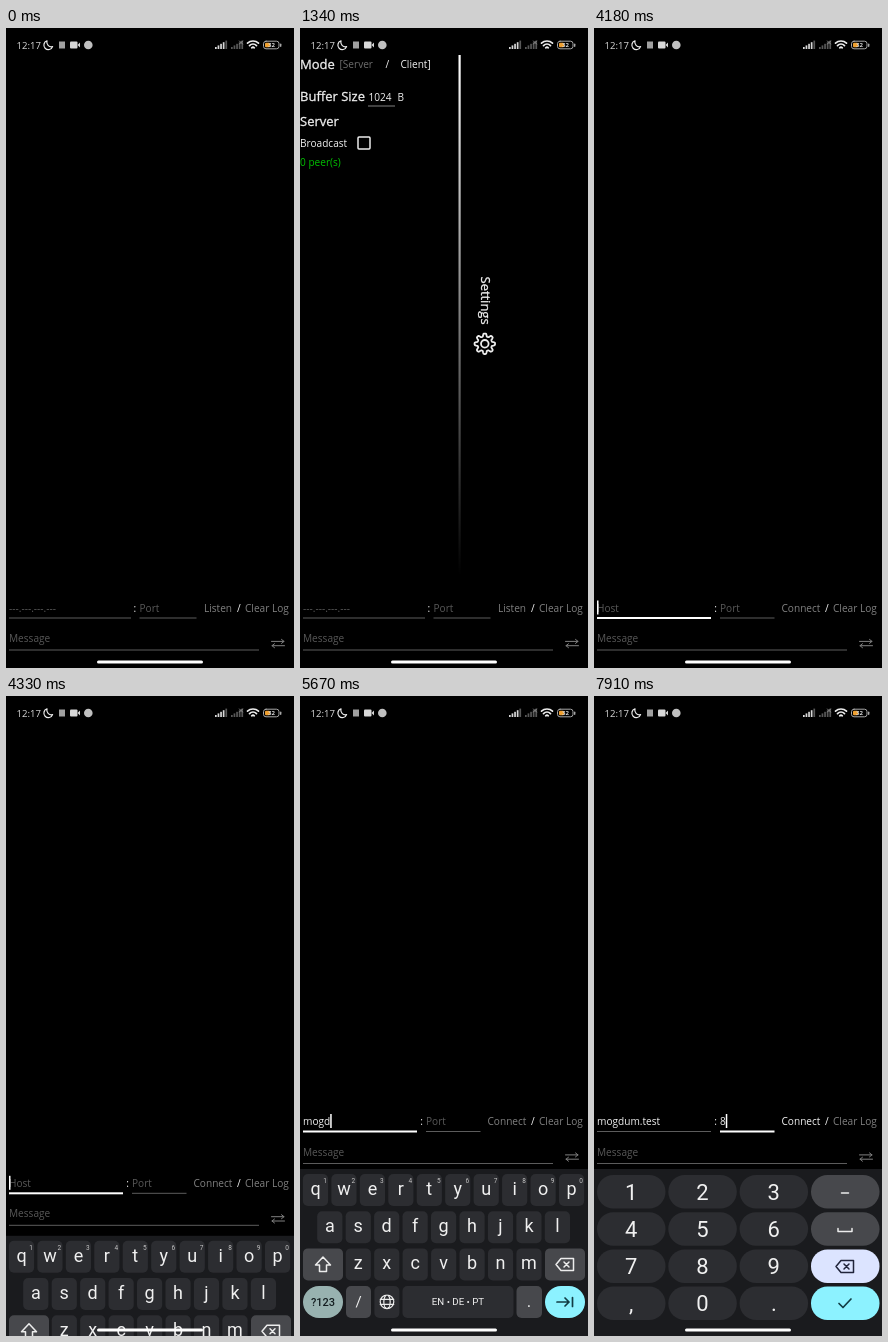
An HTML page that plays this animation: 288x640 px, repeating every 8000 ms.

```html
<!DOCTYPE html>
<html lang="en">
<head>
<meta charset="utf-8">
<title>Socket console</title>
<style>
  html, body { margin: 0; width: 100%; height: 100%; overflow: hidden; background: #000; }
  svg { display: block; width: 288px; height: 640px; }
  text { font-family: "Open Sans", "Noto Sans", sans-serif; font-size: 10.1px; white-space: pre; }
  .big { font-size: 13px; stroke: #f0f0f0; stroke-width: .3px; }
  .key { font-family: Roboto, sans-serif; text-anchor: middle; }
  .line { fill: none; stroke: #ececec; stroke-width: 1.5; stroke-linecap: round; stroke-linejoin: round; }
</style>
</head>
<body>
<svg viewBox="0 0 288 640">
  <defs>
    <linearGradient id="fade" x1="0" y1="0" x2="0" y2="1">
      <stop offset="0" stop-color="#fff"/>
      <stop offset="1" stop-color="#fff" stop-opacity="0"/>
    </linearGradient>
    <clipPath id="reveal"><rect id="revealBox" y="24" height="540"/></clipPath>
  </defs>
  <rect width="288" height="640"/>
  <g id="status"></g>
  <g id="drawer" clip-path="url(#reveal)"></g>
  <g id="handle"></g>
  <g id="form"></g>
  <g id="keyboard"><g id="letters"></g><g id="digits"></g></g>
  <rect x="91" y="632.5" width="106" height="3" rx="1.5" fill="#fff"/>
</svg>
<script>
const LOOP = 8000;
const HOST = 'mogdum.test';
const BRIGHT = '#f0f0f0', MID = '#808080', DIM = '#585858', RULE = '#5c5c5c';
const BOARD = '#1a1b1e', KEY = '#2c2d31', KEY_ALT = '#47484c', CYAN = '#8cf2ff', INK = '#123c44';

const $ = id => document.getElementById(id);
function add(parent, tag, attrs = {}, content) {
  const el = document.createElementNS('http://www.w3.org/2000/svg', tag);
  set(el, attrs);
  if (content !== undefined) el.textContent = content;
  parent.appendChild(el);
  return el;
}
function set(el, attrs) {
  for (const k in attrs) el.setAttribute(k, attrs[k]);
}
const box = (p, x, y, width, height, fill, rx = 0) => add(p, 'rect', { x, y, width, height, fill, rx });
const label = (p, x, y, s, fill = BRIGHT, cls = '') => add(p, 'text', { x, y, class: cls, style: `fill:${fill}` }, s);
const path = (p, d, style = '') => add(p, 'path', { d, class: 'line', style });
const tint = (el, c) => { el.style.fill = c; };

// Status bar
const status = $('status');
const LIT = '#d8d8d8', UNLIT = '#585858';
set(label(status, 10.5, 20.8, '12:17'), { style: `font-size:9.6px;font-weight:500;fill:${LIT}` });
path(status, 'M41 12.8a4.5 4.5 0 1 0 5.6 5.8a4.6 4.6 0 0 1 -5.6 -5.8z', 'stroke-width:1.2');
box(status, 53, 13.5, 6, 7, '#a0a0a0');
box(status, 64, 13.5, 7.5, 7, LIT, 1);
path(status, 'M71.5 17l2.5 -2.5v5z', `fill:${LIT};stroke:none`);
add(status, 'circle', { cx: 82.3, cy: 17, r: 4.3, fill: '#c0c0c0' });
for (let i = 0; i < 5; i++) {
  const h = 2 + i * 1.6;
  box(status, 209 + i * 2.6, 21 - h, 1.7, h, i < 4 ? LIT : UNLIT);
  box(status, 225 + i * 2.6, 21 - h, 1.7, h, UNLIT);
}
path(status, 'M233.5 13l3 3m0 -3l-3 3', 'stroke:#909090;stroke-width:1');
path(status, 'M241.5 15.2a8 8 0 0 1 11 0M243.5 17.6a5 5 0 0 1 7 0M245.7 19.8a2 2 0 0 1 2.6 0', 'stroke-width:1.7');
add(status, 'rect', { x: 257.5, y: 13.2, width: 15.5, height: 7.6, rx: 2.5, class: 'line', style: 'stroke:#a8a8a8;stroke-width:1' });
box(status, 259, 14.8, 5, 4.5, '#f0a030', 1);
add(status, 'text', { x: 262, y: 19.2, style: `font-size:6px;font-weight:700;fill:${LIT}` }, '32');
box(status, 274, 15.5, 1.4, 3.5, '#a8a8a8', .7);

// Settings drawer
const drawer = $('drawer');
label(drawer, 0, 41, 'Mode', BRIGHT, 'big');
const modeServer = label(drawer, 39.5, 40, '[Server');
label(drawer, 85.5, 40, '/');
const modeClient = label(drawer, 100.5, 40, 'Client]');
label(drawer, 0, 73, 'Buffer Size', BRIGHT, 'big');
label(drawer, 68.5, 72.5, '1024');
box(drawer, 68, 77.5, 27, 1, MID);
label(drawer, 97.5, 72.5, 'B');
label(drawer, 0, 98, 'Server', BRIGHT, 'big');
label(drawer, 0, 118.5, 'Broadcast');
add(drawer, 'rect', { x: 58, y: 109, width: 12, height: 12, rx: 1, class: 'line' });
label(drawer, 0, 138, '0 peer(s)', '#00c000');

// Drawer edge and its tab, placed relative to the edge
const handle = $('handle');
box(handle, -1, 27, 2.2, 520, 'url(#fade)');
set(label(handle, 0, 0, 'Settings', BRIGHT, 'big'), { transform: 'translate(21 248.5) rotate(90)' });
let gear = '';
for (let i = 0; i <= 96; i++) {
  const a = i / 96 * 2 * Math.PI;
  const r = 8.8 + 1.5 * Math.tanh(2.2 * Math.cos(8 * a));
  gear += `${i ? 'L' : 'M'}${(25.3 + r * Math.cos(a)).toFixed(2)} ${(315.8 + r * Math.sin(a)).toFixed(2)}`;
}
path(handle, gear + 'z', 'stroke-width:1.8');
add(handle, 'circle', { cx: 25.3, cy: 315.8, r: 3.8, class: 'line', style: 'stroke-width:1.8' });

// Connection form
const form = $('form');
const host = label(form, 3, 583.5, '');
const colon = label(form, 127.5, 583.5, ':');
const port = label(form, 133.5, 583.5, '');
const action = label(form, 198, 583.5, '');
label(form, 231, 583.5, '/');
label(form, 239, 583.5, 'Clear Log', MID);
const hostRule = box(form, 3, 589.5, 122, 1, RULE);
const portRule = box(form, 134, 589.5, 57, 1, RULE);
const caret = box(form, 3, 572.5, 1.5, 14, '#fff');
label(form, 3, 614, 'Message', DIM);
box(form, 3, 621.5, 250, 1, RULE);
path(form, 'M265.5 613.4h12.5m-2.5 -2l2.5 2l-2.5 2M278.5 617.7h-12.5m2.5 -2l-2.5 2l2.5 2', `stroke:${MID};stroke-width:1`);

// Keyboard
const letters = $('letters'), digits = $('digits');
const keyText = (p, x, y, s, size, fill = '#f0f0f0') =>
  add(p, 'text', { x, y, class: 'key', style: `font-size:${size}px;fill:${fill}` }, s);
const backspace = (p, x, y, ink) =>
  path(p, `M${x - 9} ${y}l5 -6h12.5v12h-12.5zM${x - 1} ${y - 2.5}l5 5m0 -5l-5 5`, `stroke:${ink}`);

box(letters, 0, 473, 288, 167, BOARD);
['qwertyuiop', 'asdfghjkl', 'zxcvbnm'].forEach((row, r) => {
  [...row].forEach((ch, i) => {
    const x = [15.5, 29.8, 58.3][r] + i * 28.45, y = 478 + r * 37.2;
    box(letters, x - 12.6, y, 25.2, 32, KEY, 5);
    keyText(letters, x, y + 21, ch, 18);
    if (!r) keyText(letters, x + 9.5, y + 9, (i + 1) % 10, 6.5, '#c4c4c4');
  });
});
box(letters, 3, 552.4, 40, 32, KEY_ALT, 5);
path(letters, 'M23 561l7.5 8h-4v6.5h-7v-6.5h-4z');
box(letters, 245, 552.4, 40, 32, KEY_ALT, 5);
backspace(letters, 265, 568.5, '#ececec');
box(letters, 3, 590, 40, 32, '#98b2b0', 16);
keyText(letters, 23, 609.5, '?123', 11, '#141e20').style.fontWeight = 500;
box(letters, 46, 590, 25, 32, KEY_ALT, 5);
keyText(letters, 58.5, 611, '/', 15);
box(letters, 74.4, 590, 25, 32, KEY, 5);
path(letters, 'M80.2 603.3h13.6M80.2 608.3h13.6M87 599a6.8 6.8 0 0 0 0 13.6a6.8 6.8 0 0 0 0 -13.6a3.2 6.8 0 0 0 0 13.6a3.2 6.8 0 0 0 0 -13.6', 'stroke-width:1.2');
box(letters, 102.5, 590, 111, 32, KEY, 5);
keyText(letters, 158, 609, 'EN • DE • PT', 9.7);
box(letters, 216.5, 590, 25.5, 32, KEY_ALT, 5);
keyText(letters, 229, 611, '.', 17);
box(letters, 245, 590, 40, 32, CYAN, 16);
path(letters, 'M257 606h12m-4 -4l4 4l-4 4M272.5 601.5v9', `stroke:${INK};stroke-width:1.7`);

box(digits, 0, 473, 288, 167, BOARD);
['123', '456', '789', ',0.'].forEach((row, r) => {
  const y = 479 + r * 37.2;
  [...row].forEach((ch, i) => {
    box(digits, 3 + i * 71.3, y, 68.5, 33.5, KEY, 16.5);
    keyText(digits, 37.2 + i * 71.3, y + 24.5, ch, 22);
  });
  box(digits, 217, y, 68.5, 33.5, [KEY_ALT, KEY_ALT, '#dce4ff', CYAN][r], 16.5);
});
path(digits, 'M247.5 497h7M244 532.5v3h14v-3');
backspace(digits, 251, 570.5, '#20243a');
path(digits, 'M245 607.5l4 4l8 -8.5', `stroke:${INK};stroke-width:1.7`);

// Value of the last [time, value] pair already reached
const held = (t, pairs) => pairs.reduce((v, [at, next]) => t >= at ? next : v, pairs[0][1]);
const mix = (a, b, k) => a + (b - a) * k;

function draw(t) {
  // Drawer
  const w = held(t, [[0, 0], [900, 8], [1040, 88], [1190, 149], [1340, 159.5], [2990, 128], [3140, 44], [3280, 0]]);
  const open = w / 159.5;
  set($('revealBox'), { width: w });
  set(handle, { transform: `translate(${w} 0)`, opacity: open < .1 ? 0 : open });

  // Server to client
  const k = held(t, [[0, 0], [2090, .3], [2240, .7], [2390, .93], [2540, 1]]);
  const client = k > .2;
  set(modeServer, { opacity: mix(.45, 1, k) });
  set(modeClient, { opacity: mix(1, .45, k) });

  // Typing and focus
  const count = Math.max(0, Math.min(HOST.length, Math.floor((t - 5220) / 149.5) + 1));
  const onHost = t >= 4180 && t < 7010, onPort = t >= 7010, ready = t >= 7910;
  host.textContent = count ? HOST.slice(0, count) : client ? 'Host' : '---.---.---.---';
  tint(host, count ? BRIGHT : DIM);
  port.textContent = ready ? '8' : 'Port';
  tint(port, ready ? BRIGHT : DIM);
  action.textContent = client ? 'Connect' : 'Listen';
  tint(action, ready ? BRIGHT : MID);
  set(action, { x: client ? 187.5 : 198 });
  const portX = mix(133.5, 126, k);
  set(colon, { x: mix(127.5, 120.3, k) });
  set(port, { x: portX });
  const rule = (el, x, width, on) => set(el, { x, width, y: on ? 589 : 589.5, height: on ? 2 : 1, fill: on ? '#fff' : RULE });
  rule(hostRule, 3, mix(122, 114, k), onHost);
  rule(portRule, portX, mix(57, 54.5, k), onPort);

  const caretOn = (onHost && !(t >= 4780 && t < 5220)) || (onPort && (t < 7460 || ready));
  const caretX = onPort
    ? portX + (ready ? port.getComputedTextLength() : 0)
    : 3 + (count ? host.getComputedTextLength() : 0);
  set(caret, { x: caretX, opacity: caretOn ? 1 : 0 });

  // Keyboard
  const up = held(t, [[0, 0], [4330, .6], [4480, 1]]);
  set(form, { transform: `translate(0 ${-154.5 * up})` });
  set($('keyboard'), { transform: `translate(0 ${167 * (1 - up)})` });
  letters.style.display = t < 7160 ? '' : 'none';
  digits.style.display = t < 7160 ? 'none' : '';
}

const start = performance.now();
function tick() {
  draw((performance.now() - start) % LOOP);
  requestAnimationFrame(tick);
}
tick();
</script>
</body>
</html>
```
